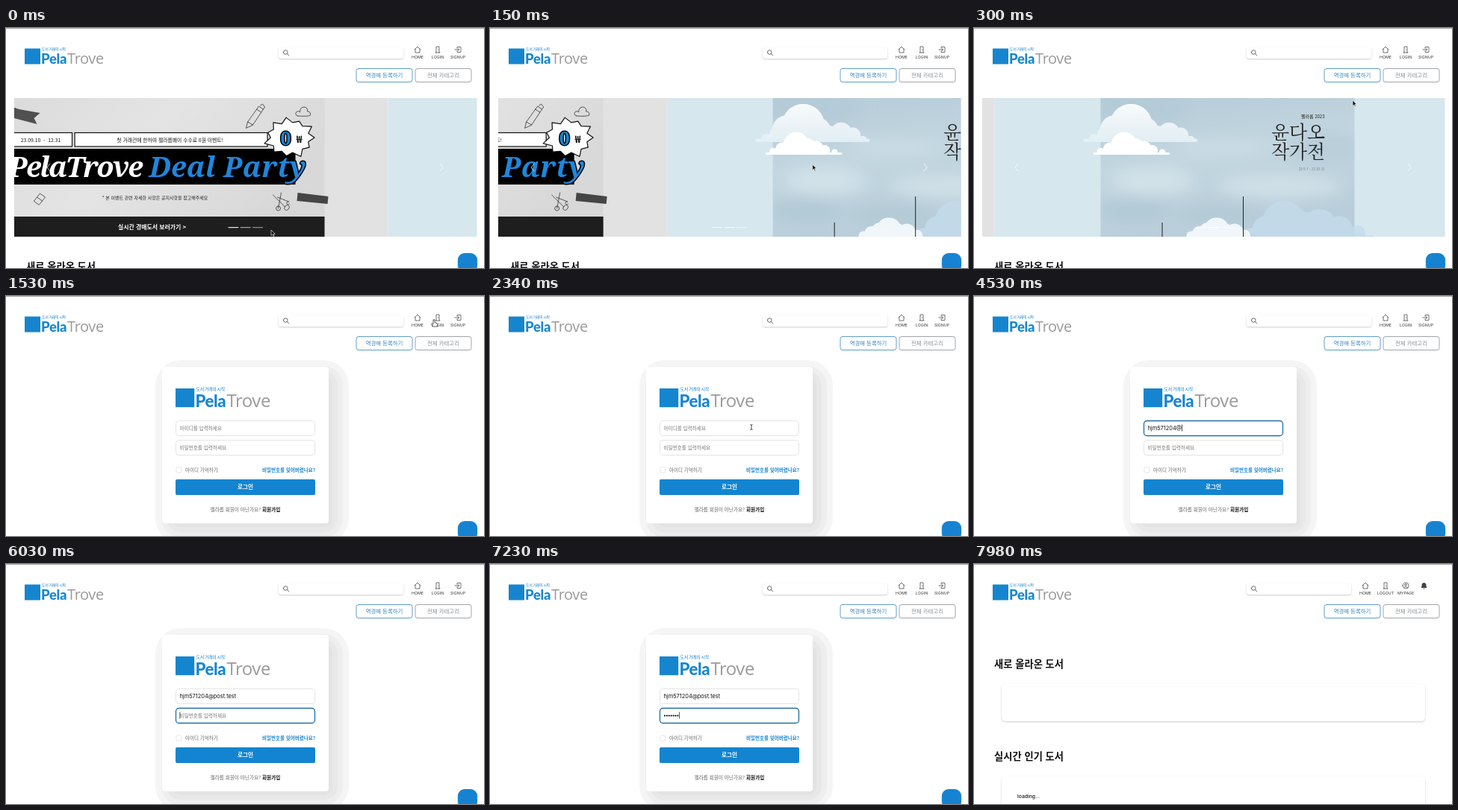
An HTML page for the animation above (8 s loop, 640 px wide and 322 px high).

```html
<!DOCTYPE html>
<html lang="ko">
<head>
<meta charset="utf-8">
<style>
html, body { margin: 0; width: 100%; height: 100%; overflow: hidden; background: #fff; }
svg { display: block; width: 640px; height: 322px; font-family: "Noto Sans CJK KR", "Noto Sans CJK", sans-serif; }
.lat { font-family: Inter, sans-serif; }
.mid { text-anchor: middle; }
.end { text-anchor: end; }
.b { font-weight: 700; }
.m { font-weight: 500; }
.line { fill: none; stroke: #333; stroke-linecap: round; stroke-linejoin: round; }
.ink { paint-order: stroke; stroke: #000; stroke-width: 3px; stroke-linejoin: round; }
.brush { font: italic 900 38px "Noto Serif", serif; }
.soft { filter: drop-shadow(0 1px 1px rgba(0, 0, 0, .2)); }
</style>
</head>
<body>
<svg id="stage" viewBox="0 0 640 322"></svg>
<script>
const LOOP = 8000, BLUE = '#1685cf', BRAND = '펠라롭', EMAIL = 'hjm571204@post.test';
const LOGIN_AT = 1530, FOCUS_AT = 2700, TAB_AT = 5850, HOME_AT = 7770;

const text = (x, y, size, fill, str, cls = '', more = '') =>
  `<text x="${x}" y="${y}" font-size="${size}" fill="${fill}" class="${cls}" ${more}>${str}</text>`;
const rect = (x, y, w, h, fill, more = '') =>
  `<rect x="${x}" y="${y}" width="${w}" height="${h}" fill="${fill}" ${more}/>`;
const line = (d, color = '#333', width = .8, more = '') =>
  `<path class="line" d="${d}" style="stroke:${color};stroke-width:${width}" ${more}/>`;
const group = (id, body, more = '') => `<g id="${id}" ${more}>${body}</g>`;

// Flat-bottomed cloud: puffs given as [centre, radius] in shares of the width
function cloud(x, y, w, fill, opacity, puffs) {
  const dots = puffs.map(([c, r]) => `<circle cx="${x + c * w}" cy="${y - r * w * .8}" r="${r * w}"/>`).join('');
  const below = Math.max(...puffs.map(p => p[1])) * w * .2;
  return `<g fill="${fill}" opacity="${opacity}" clip-path="inset(0 0 ${below}px 0)">${dots}
    ${rect(x, y - w * .03, w, w * .03, fill, `rx="${w * .015}"`)}</g>`;
}

const logo = at => `<g transform="${at}">
  ${rect(25, 27.5, 21, 21, BLUE)}
  ${text(48, 30, 5, BLUE, '도서 거래의 시작', 'm', 'letter-spacing="-.35"')}
  <text x="47" y="48" font-size="18.5" fill="${BLUE}" font-weight="800" font-family="Lato, sans-serif" letter-spacing="-.3">Pela</text>
  <text x="82" y="48" font-size="20" fill="#9a9a9a" font-family="'Open Sans', sans-serif" letter-spacing="-.4">Trove</text></g>`;

const icons = {
  home: 'M-4 0L0-4L4 0M-3-1V4H3V-1',
  door: 'M-3 4H3M-2 4V-4H2V4M.8 0V.3',
  enter: 'M-1-2V-3.5H4V3.5H-1V2M-4 0H1.5M0-1.6L1.6 0L0 1.6',
  user: 'M-4 0A4 4 0 1 1 4 0A4 4 0 1 1-4 0M-2.6 3Q0 0 2.6 3M-1.3-1A1.3 1.3 0 1 1 1.3-1A1.3 1.3 0 1 1-1.3-1'
};
const nav = (x, icon, label) =>
  line(icons[icon], '#444', .75, `transform="translate(${x} 29)"`) + text(x, 40.5, 5.3, '#555', label, 'lat mid m');
const search = w => rect(365, 26, w, 15, '#fff', 'rx="3" class="soft"') +
  line('M371.5 32.5a2.8 2.8 0 1 1 5.6 0a2.8 2.8 0 1 1-5.6 0M376.4 34.6l2.4 2.4', '#444', .8);
const button = (x, color, label) =>
  rect(x, 54.5, 75, 18, '#fff', `rx="3" stroke="${color}" stroke-width=".8"`) + text(x + 37.5, 66.3, 7.4, color, label, 'mid');

const header = rect(0, 0, 640, 1, '#a5a5a5') + logo('') +
  button(469, '#3586bd', '역경매 등록하기') + button(548, '#8a8f93', '전체 카테고리') +
  group('guest', search(167) + nav(551, 'home', 'HOME') + nav(578, 'door', 'LOGIN') + nav(605, 'enter', 'SIGNUP')) +
  group('member', search(140) + nav(524, 'home', 'HOME') + nav(551, 'door', 'LOGOUT') + nav(578, 'user', 'MYPAGE') +
    '<path fill="#444" d="M598.5 32q1-1 1-3.5q0-3 3-3.5q3 .5 3 3.5q0 2.5 1 3.5zM601.3 32.7h2.4q-1.2 2-2.4 0z"/>');

// Spiky balloon as a star of alternating radii
const burst = Array.from({ length: 22 }, (_, i) => {
  const a = i * Math.PI / 11, r = i % 2 ? .78 : 1 + .08 * Math.sin(i * 2);
  return [380.5 + 33 * r * Math.cos(a), 147 + 26 * r * Math.sin(a)].map(v => v.toFixed(1)).join();
}).join(' ');

const slideA = rect(-108, 94, 620, 186, '#e2e2e2') + rect(-22, 94, 449, 186, 'url(#paper)') +
  '<path fill="#505050" d="M-6 101L18 109L46 114L38 121L42 129L11 121L-10 116z"/><path fill="#454545" d="M391 221L432 226L431 236L390 232z"/>' +
  rect(-30, 140.5, 119, 18.5, '#fff', 'stroke="#111" stroke-width="1.2"') +
  rect(92.5, 140.5, 258, 18.5, '#fff', 'stroke="#111" stroke-width="1.2"') +
  text(47, 152.5, 6.8, '#111', '23.09.10 &#160;- &#160;12.31', 'mid') +
  text(220, 152.5, 6.8, '#111', `첫 거래건에 한하여 ${BRAND}페이 수수료 0원 이벤트!`, 'mid') +
  rect(-22, 162, 410, 48, '#000') +
  `<polygon points="${burst}" fill="#fff" stroke="#111" stroke-width="1.2" stroke-linejoin="round"/>` +
  text(375, 157, 25, BLUE, '0', 'mid b ink', 'font-family="Noto Serif, serif"') + text(393, 154, 13, '#111', '₩', 'mid b') +
  text(4, 200, 38, '#fff', 'PelaTrove', 'brush ink', 'letter-spacing="-1.8"') +
  text(192, 200, 38, '#1f86dc', 'Deal Party', 'brush ink', 'letter-spacing=".3"') +
  text(200, 230, 6, '#222', '* 본 이벤트 관련 자세한 사항은 공지사항을 참고해주세요', 'mid') +
  rect(-22, 253, 449, 27, '#1e1e1e') + text(196, 270, 7.9, '#fff', '실시간 경매도서 보러가기 &gt;', 'mid b') +
  line('M322 134L324 126L339 105L345 109L331 130zM324 126L331 130M336 109L342 113M341 104L344 102L347 106L345 109') +
  line('M391 118Q386 116 390 112Q393 111 394 113Q394 106 400 106Q405 107 404 112Q409 112 408 117Q405 119 391 118') +
  line('M38 232L46 222L53 227L45 237zM42 227L49 232') +
  line('M358 224L374 240M369 221L365 242M374 240a3 2.5 0 1 0 5 2a3 2.5 0 1 0-5-2M365 239a3 3 0 1 0 0 6a3 3 0 1 0 0-6M364 227L379 233M379 233a2 2 0 1 0 1 3');

// Hazy patches behind the drawn clouds
const haze = [
  [240, 205, 55, 18, '#d3e2e9'], [410, 212, 85, 16, '#d0e0e7'], [330, 160, 65, 12, '#cbdce4'],
  [215, 245, 50, 14, '#b0c9d6'], [330, 250, 60, 14, '#b3cad6'], [470, 160, 50, 20, '#b9cedA'], [230, 110, 60, 12, '#b2cad7']
].map(([x, y, w, h, c]) => `<ellipse cx="${x}" cy="${y}" rx="${w}" ry="${h}" fill="${c}"/>`).join('');

const slideB = rect(28, 94, 620, 186, '#d6e7ee') + rect(170, 94, 340, 186, 'url(#sky)') +
  `<g clip-path="url(#photo)"><g filter="url(#blur)">${haze}</g></g>` +
  cloud(361, 284, 176, '#c3dcec', .8, [[.06, .05], [.17, .1], [.31, .165], [.45, .12], [.58, .13], [.73, .1], [.87, .06]]) +
  cloud(146, 153, 154, 'url(#mist)', .92, [[.1, .04], [.2, .075], [.28, .13], [.42, .185], [.54, .12], [.64, .08], [.75, .095], [.85, .07], [.94, .03]]) +
  cloud(160, 170, 103, '#fff', 1, [[.1, .05], [.22, .09], [.4, .165], [.54, .12], [.66, .1], [.77, .07], [.9, .04]]) +
  cloud(284, 284, 92, '#f3f8fb', .95, [[.08, .07], [.2, .11], [.33, .14], [.45, .18], [.58, .13], [.71, .13], [.86, .08]]) +
  rect(252, 261, 1, 19, '#222') + rect(360.5, 226, 1, 54, '#222') +
  text(470, 120.5, 6, '#222', `${BRAND} 2023`, 'end m') +
  `<g font-family="'Noto Serif CJK KR', 'Noto Sans CJK KR', serif" font-weight="300">${
    text(470.5, 149, 24.8, '#222', '윤다오', 'end') + text(470.5, 175, 24.8, '#222', '작가전', 'end')}</g>` +
  text(470, 191, 4.6, '#78868e', '23.9.7 - 23.10.31', 'end');

const dash = i => rect(297.5 + 16.3 * i, 267, 13.8, 1.2, '#fff', `id="dash${i}"`);
const heading = (y, str) => text(27, y, 13.3, '#111', str, 'b');
const home = group('home',
  '<g clip-path="url(#frame)">' + group('slideA', slideA) + group('slideB', slideB) + '</g>' +
  dash(0) + dash(1) + dash(2) +
  line('M59 182L55 187L59 192M581 182L585 187L581 192', '#fff', 1, 'opacity=".75"') +
  heading(324.6, '새로 올라온 도서'));

const shade = [18, 10, 3, -4].map((g, i) =>
  rect(218 - g, 104 - g, 223 + 2 * g, 210 + 2 * g, ['#f5f5f5', '#eeeeee', '#e8e8e8', '#e3e3e3'][i], `rx="${16 + g}"`)).join('');
const field = (id, y) => rect(227.5, y + .5, 186, 20, '#fff', `rx="4" id="${id}"`);
const login = group('login', shade + rect(209, 95, 223, 210, '#fff', 'rx="4"') +
  logo('translate(227 115) scale(1.2) translate(-25 -20)') +
  field('idBox', 167) + field('pwBox', 193) +
  text(232.5, 179.7, 6.6, '#777', '아이디를 입력하세요', '', 'id="idHint"') +
  text(232.5, 205.5, 6.6, '#777', '비밀번호를 입력하세요', '', 'id="pwHint"') +
  text(232.5, 179.8, 7.4, '#111', '', 'lat', 'id="idText"') + group('dots', '') +
  rect(0, 0, .8, 9, '#222', 'id="caret"') +
  '<circle cx="231.5" cy="233.5" r="4" fill="#fff" stroke="#ddd" stroke-width=".8"/>' +
  text(240, 235.5, 6.5, '#666', '아이디 기억하기') +
  text(414, 235.5, 6.5, BLUE, '비밀번호를 잊어버렸나요?', 'end b') +
  rect(227, 246, 187, 21, '#1385d0', 'rx="2"') + text(320.5, 259, 7.6, '#fff', '로그인', 'mid b') +
  text(320.5, 288.5, 6.6, '#666', `${BRAND} 회원이 아닌가요? <tspan class="b" fill="#111">회원가입</tspan>`, 'mid'));

const panel = y => rect(37, y, 567, 50, '#fff', 'rx="5" class="soft"');
const member = group('loading', heading(139, '새로 올라온 도서') + panel(161) +
  heading(262.5, '실시간 인기 도서') + panel(285) + text(58, 313.8, 6.8, '#111', 'loading...', 'lat m'));

stage.innerHTML = `<defs>
  <clipPath id="frame">${rect(11, 94, 619.5, 186)}</clipPath>
  <clipPath id="photo">${rect(170, 94, 340, 186)}</clipPath>
  <filter id="blur" x="-20%" y="-20%" width="140%" height="140%"><feGaussianBlur stdDeviation="10"/></filter>
  <linearGradient id="paper" x2="1" y2=".4"><stop stop-color="#dadada"/><stop offset=".5" stop-color="#e4e4e4"/><stop offset="1" stop-color="#d8d8d8"/></linearGradient>
  <linearGradient id="sky" x2=".3" y2="1"><stop stop-color="#b5cbd7"/><stop offset=".5" stop-color="#c2d6e0"/><stop offset="1" stop-color="#b9ceda"/></linearGradient>
  <linearGradient id="mist" gradientUnits="userSpaceOnUse" x1="0" y1="101" x2="0" y2="153"><stop stop-color="#fff"/><stop offset="1" stop-color="#e4f0f5"/></linearGradient>
  </defs>` + header + home + login + member +
  rect(605, 302, 26, 26, '#1683d2', 'rx="9" id="chat" class="soft"') +
  '<path id="arrow" d="M0 0V7.5L1.8 5.9L3 8.5L4.2 8L3 5.4H5.3z" fill="#111" stroke="#fff" stroke-width=".6"/>' +
  '<path id="hand" d="M-1 0Q0-1 1 0V3.5L4 4.5Q5 5 4.5 9H-1L-3.5 5.5Q-3 4.5-1 6z" fill="#fff" stroke="#111" stroke-width=".7"/>' +
  line('M-1.2-3.5Q0-3.5 0-2.5Q0-3.5 1.2-3.5M0-2.5V2.5M-1.2 3.5Q0 3.5 0 2.5Q0 3.5 1.2 3.5', '#222', .8, 'id="beam"');

const el = id => document.getElementById(id);
const show = (id, on) => el(id).style.display = on ? '' : 'none';
const move = (id, x, y = 0) => el(id).setAttribute('transform', `translate(${x} ${y})`);
const share = (t, a, b) => Math.min(1, Math.max(0, (t - a) / (b - a)));
const ease = k => k * k * (3 - 2 * k);
const typed = (t, start, end, n) => t < start ? 0 : Math.min(n, 1 + Math.floor(share(t, start, end) * (n - 1)));

const path = [[0, 355, 271], [300, 507, 97], [810, 574, 34], [1020, 573, 32], [1600, 573, 32], [2310, 350, 176], [8000, 350, 176]];
function pointer(t) {
  const i = path.findIndex(p => p[0] > t), [a, x0, y0] = path[i - 1], [b, x1, y1] = path[i];
  const k = ease(share(t, a, b));
  return [x0 + (x1 - x0) * k, y0 + (y1 - y0) * k];
}

function outline(id, on) {
  el(id).setAttribute('stroke', on ? '#1f6fa5' : '#ddd');
  el(id).setAttribute('stroke-width', on ? 1.3 : .8);
}

function draw(t) {
  const onLogin = t >= LOGIN_AT && t < HOME_AT, done = t >= HOME_AT;
  show('home', t < LOGIN_AT);
  show('login', onLogin);
  show('loading', done);
  show('guest', !done);
  show('member', done);
  show('chat', !done);

  const slid = ease(share(t, -134, 348)), left = 619 * (1 - slid);
  move('slideA', left - 501);
  move('slideB', left - 17);
  [1 - slid / 2, .5 + slid / 2, .5].forEach((o, i) => el('dash' + i).setAttribute('opacity', o));

  const n = typed(t, 3240, 3930, 9) + (t >= 4290 ? 1 : 0) + typed(t, 4560, 5280, 9);
  const m = t < 6180 ? 0 : t < 7230 ? typed(t, 6180, 7050, 7) : 7 + typed(t, 7290, 7470, 3);
  const onPw = t >= TAB_AT;
  el('idText').textContent = EMAIL.slice(0, n);
  show('idHint', !n);
  show('pwHint', !m);
  el('dots').innerHTML = Array.from({ length: m }, (_, i) => `<circle cx="${234 + 2.9 * i}" cy="203.5" r="1.1"/>`).join('');
  outline('idBox', t >= FOCUS_AT && !onPw);
  outline('pwBox', onPw);
  show('caret', t >= FOCUS_AT);
  if (onLogin) move('caret', onPw ? 232.5 + 2.9 * m + (m ? .5 : 0) : 232.8 + (n ? el('idText').getComputedTextLength() : 0), onPw ? 198.5 : 172.5);

  const [x, y] = pointer(t), visible = t < 3240;
  const overLink = x > 565 && y < 44, overField = onLogin && x < 414 && y > 167;
  show('hand', visible && overLink);
  show('beam', visible && overField);
  show('arrow', visible && !overLink && !overField);
  ['arrow', 'hand', 'beam'].forEach(id => move(id, x, y));
}

const start = performance.now();
function tick() {
  draw((performance.now() - start) % LOOP);
  requestAnimationFrame(tick);
}
tick();
</script>
</body>
</html>
```
